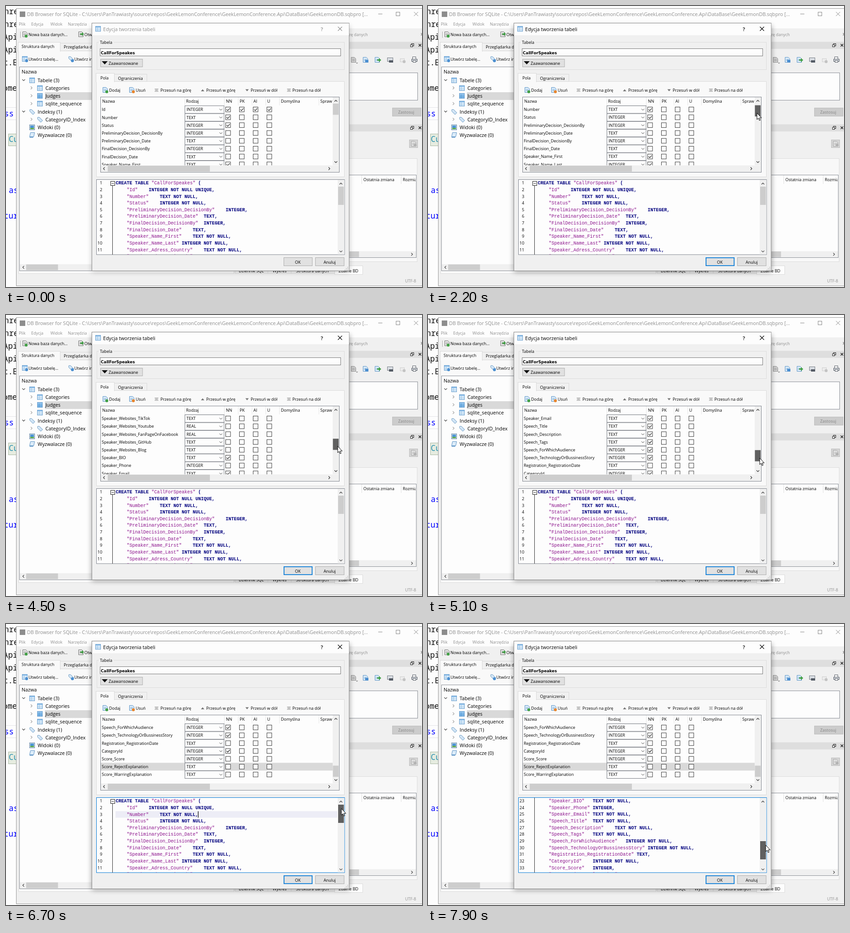
An HTML page that plays this animation: 908 by 616 pixels, repeating every 8 s.

```html
<!DOCTYPE html>
<html lang="pl">
<head>
<meta charset="utf-8">
<title>Edycja tworzenia tabeli</title>
<style>
html, body { margin: 0; width: 100%; height: 100%; overflow: hidden; background: #fdfdfd; }
svg { display: block; width: 908px; height: 616px; }
text { white-space: pre; font-family: "Open Sans", "Noto Sans", sans-serif; font-size: 8.95px; fill: #000; }
.ui { font-size: 10.7px; }
.gray { fill: #8e8e8e; }
.code { font: 10px "Liberation Mono", monospace; }
.kw { font-weight: 700; fill: #00007f; }
.str { fill: #8b108b; }
.vs { font: 17.4px "Noto Sans Mono", monospace; }
.name { font: 700 8.65px "DejaVu Sans", sans-serif; }
.end { text-anchor: end; }
.mid { text-anchor: middle; }
</style>
</head>
<body>
<svg id="stage" viewBox="0 0 908 616" xmlns="http://www.w3.org/2000/svg"></svg>
<script>
const WHITE = '#fdfdfd', FACE = '#f0f0f0', THUMB = '#cdcdcd', PRESSED = '#606060', BLUE = '#0078d7';
const ROW = 17.2, LINE = 14.65, TOP_STEP = 96.5 / 27, CODE_STEP = 40 / 11;

// name, type (I, T, R), * = not null
const fields = `Id I*|Number T*|Status I*|PreliminaryDecision_DecisionBy I|PreliminaryDecision_Date T
FinalDecision_DecisionBy I|FinalDecision_Date T|Speaker_Name_First T*|Speaker_Name_Last I*
Speaker_Adress_Country T*|Speaker_Adress_ZipCode T*|Speaker_Adress_City T*|Speaker_Adress_Street T*
Speaker_Websites_Facebook T|Speaker_Websites_Twitter T|Speaker_Websites_Instagram T
Speaker_Websites_TikTok T|Speaker_Websites_Youtube R|Speaker_Websites_FanPageOnFacebook R
Speaker_Websites_GitHub T|Speaker_Websites_Blog T|Speaker_BIO T*|Speaker_Phone I|Speaker_Email T*
Speech_Title T*|Speech_Description T*|Speech_Tags T*|Speech_ForWhichAudience I*
Speech_TechnologyOrBussinessStory I*|Registration_RegistrationDate T|CategoryId I*
Score_Score I|Score_RejectExplanation T|Score_WarringExplanation T`
  .split(/[|\n]/).map(s => {
    const [name, spec] = s.split(' ');
    return { name, type: { I: 'INTEGER', T: 'TEXT', R: 'REAL' }[spec[0]], nn: spec.length > 1 };
  });

const text = (x, y, s, cls = '', attr = '') => `<text x="${x}" y="${y}" class="${cls}" ${attr}>${s}</text>`;
const rect = (x, y, w, h, fill, stroke = 'none', attr = '') =>
  `<rect x="${x}" y="${y}" width="${w}" height="${h}" fill="${fill}" stroke="${stroke}" ${attr}/>`;
const path = (d, stroke = '#333', width = 1, fill = 'none') =>
  `<path d="${d}" stroke="${stroke}" stroke-width="${width}" fill="${fill}"/>`;
const shape = (d, fill) => `<path d="${d}" fill="${fill}"/>`;
const group = (attr, ...parts) => `<g ${attr}>${parts.join('')}</g>`;

// chevron pointing up, down, left or right around a centre
function chevron(x, y, dir, color = '#333', r = 3, w = 1.1) {
  const h = r / 2;
  const pts = {
    u: [-r, h, 0, -h, r, h], d: [-r, -h, 0, h, r, -h],
    l: [h, -r, -h, 0, h, r], r: [-h, -r, h, 0, -h, r]
  }[dir];
  return path(`M${x + pts[0]} ${y + pts[1]}L${x + pts[2]} ${y + pts[3]}L${x + pts[4]} ${y + pts[5]}`, color, w);
}
const cross = (x, y, r, color, w = 1) => path(`M${x - r} ${y - r}l${2 * r} ${2 * r}m0 ${-2 * r}l${-2 * r} ${2 * r}`, color, w);

const tableIcon = (x, y, fill = '#e4f1fc', line = '#8fbbe0') =>
  rect(x + .5, y + .5, 11, 11, fill, '#6a9fce') + rect(x + 1, y + 1, 10, 2.5, '#8fc0ea') +
  path(`M${x + 1} ${y + 6.5}h10m-10 2.8h10M${x + 4.5} ${y + 3}v8.5`, line, .8);
const tagIcon = (x, y) =>
  path(`M${x + 1} ${y + 1}h4l7 7-4 4-7-7Z`, '#6d9cc4', 1, '#cfe3f5') + `<circle cx="${x + 3.4}" cy="${y + 3.4}" r="1" fill="#fff"/>`;
const docIcon = (x, y, line = '#5b93c6', fill = '#dcecf9') =>
  path(`M${x + .5} ${y + .5}h7l3 3v8h-10Z`, line, 1, fill) + path(`M${x + 2.5} ${y + 5}h6m-6 2.5h6`, line, .8);
const badge = (x, y, color) => `<circle cx="${x}" cy="${y}" r="3.2" fill="${color}"/>`;
const printer = (x, y, c) => rect(x + 2.5, y - .5, 7, 5, WHITE, c) + rect(x + .5, y + 4.5, 12, 5, '#d4d8de', c) + rect(x + 3.5, y + 7.5, 6, 4, WHITE, c);
const floatIcon = (x, y) => rect(x + 2, y, 5, 5, 'none', '#222') + rect(x, y + 2.5, 4.5, 4.5, FACE, '#222');

function backdrop() {
  const bits = [[0, 18, -4, 'nre'], [0, 46, -4, 'nre'], [0, 74, -6, 'Api'], [0, 102, -6, 'Api'], [0, 130, -6, 't.E'],
    [0, 186, -7, 'ome'], [1, 242, -4, 'ss'], [1, 410, 6, 'as'], [1, 466, -5, 'tur']];
  return rect(0, 0, 908, 616, WHITE) +
    path('M0 222.5h23M0 249.5h23', '#e2e2e8') +
    rect(5.5, 280.5, 30, 26, '#e6ece0', '#a9b8a4') + text(6, 298, 'Cu', 'vs', 'style="fill:#2b91af"') +
    bits.map(([blue, y, x, s]) => text(x, y, s, 'vs', `style="fill:${blue ? '#0000ff' : '#111'}"`)).join('');
}

function tree() {
  const kids = [['Tabele (3)', 0, 't', 'd'], ['Categories', 1, 't', 'r'], ['Judges', 1, 's', 'r'], ['sqlite_sequence', 1, 't', 'r'],
    ['Indeksy (1)', 0, 'g', 'd'], ['CategoryID_Index', 1, 'g', 'r'], ['Widoki (0)', 0, 'v', ''], ['Wyzwalacze (0)', 0, 'w', '']];
  const icon = (k, x, y) => ({
    t: () => tableIcon(x, y),
    s: () => tableIcon(x, y, '#86bdea', '#4f94d0'),
    g: () => tagIcon(x, y),
    v: () => rect(x + .5, y + .5, 11, 11, '#e8f0e4', '#5b7fa6') + rect(x + 2, y + 2, 8, 5, '#4d94d8') + rect(x + 2, y + 7, 8, 3, '#5aa84f'),
    w: () => path(`M${x + 2.5} ${y + .5}h9l-2 9h-9Z`, '#5b93c6', 1, '#dcecf9') + path(`M${x + .5} ${y + 11}h8`, '#5b93c6', 1.5)
  })[k]();
  return rect(29.5, 133.5, 460, 447, WHITE, '#8b8f97') + text(34, 148, 'Nazwa', 'ui') +
    rect(85, 189, 110, 17, '#d9d9d9') +
    kids.map(([s, sub, k, dir], i) => {
      const y = 162.8 + i * ROW, x = 51 + sub * 17;
      return (dir ? chevron(x - 12.5, y - .5, dir, sub ? '#999' : '#333', 3) : '') + icon(k, x, Math.round(y - 6)) + text(x + 18, y + 4, s, 'ui');
    }).join('') +
    rect(30, 566, 458, 14, FACE) + rect(44, 566.5, 69.5, 12.5, THUMB) + chevron(38, 572.8, 'l');
}

function rightPanels() {
  const dock = y => rect(745, y, 163, 15.5, '#dedede') + floatIcon(883, y + 4) + cross(903.5, y + 7.5, 2.8, '#222', 1.4);
  return text(748, 66, 'zę danych', 'gray') + chevron(907, 62, 'r', '#777', 2.5) +
    dock(78.5) +
    docIcon(753, 112, '#8f8f8f', '#cfcfcf') + chevron(766, 125, 'd', '#777', 1.6) +
    docIcon(779, 112) + rect(784, 118, 7, 6, '#4c8fd0') +
    docIcon(805, 112) + shape('M810 117h4v-3l5 4.5-5 4.5v-3h-4Z', '#43a047') +
    rect(832.5, 113.5, 12, 8, '#d9dde3', '#7a8088') + rect(836, 119, 9, 5, '#555c66') +
    rect(860.5, 115.5, 9, 7, '#ececec', '#cfcfcf') + badge(869, 122, '#c3c3c3') +
    printer(885, 112, '#5a6068') +
    rect(740.5, 146.5, 158, 60, WHITE, '#8b8f97') +
    rect(843.5, 223.5, 62.5, 18, '#cccccc', '#bdbdbd') + text(856, 236, 'Zastosuj', '', 'style="fill:#838383"') +
    dock(259.5) +
    rect(880.5, 293.5, 18, 17, '#d6d6d6', '#bcbcbc') + docIcon(884, 296, '#a2a2a2', '#e2e2e2') + badge(893, 305, '#b4b4b4') +
    rect(740.5, 334.5, 157, 226, '#f8f8f8', '#dcdcdc') +
    rect(740.5, 370.5, 155, 181, WHITE, '#8b8f97') + path('M776.5 371v19M862.5 371v19', '#e0e0e0') +
    text(780, 383.5, 'Ostatnia zmiana') + group('clip-path="url(#cutRight)"', text(866, 383.5, 'Rozmiar')) +
    rect(741, 537.5, 154, 13.5, FACE) + rect(745, 538, 25.5, 12.5, THUMB) + chevron(886, 544.3, 'r');
}

function mainWindow() {
  return rect(22.5, 5.5, 890, 608, FACE, '#9a9a9a') + rect(23, 6, 885, 43, WHITE) +
    rect(30, 12, 12, 12, '#8d8d8d') +
    text(46, 21.5, 'DB Browser for SQLite - C:\\Users\\PanTrawiasty\\source\\repos\\GeekLemonConference\\GeekLemonConference.Api\\DataBase\\GeekLemonDB.sqbpro [...', 'ui gray') +
    path('M812.5 17.5h9', '#888') + rect(851.5, 13.5, 8, 8, 'none', '#888') + cross(895, 17.5, 4.5, '#888') +
    [[28, 'Plik'], [55, 'Edycja'], [97, 'Widok'], [135, 'Narzędzia']].map(([x, s]) => text(x, 43, s, 'gray')).join('') +
    path('M31.5 56v14', '#b0b0b0', 1) +
    docIcon(36, 56, '#777', '#e6e6e6') + badge(44, 66, '#43a047') + text(49, 66, 'Nowa baza danych...') +
    docIcon(158, 56, '#777', '#e6e6e6') + shape('M162 60h4v-3l4 4.5-4 4.5v-3h-4Z', '#43a047') + text(171, 66, 'Otwórz') +
    rect(27.5, 98.5, 470, 488, '#f9f9f9', '#dcdcdc') +
    rect(118.5, 81.5, 90, 17, FACE, '#d9d9d9') + text(126, 93, 'Przeglądarka danych') +
    rect(26.5, 79.5, 92, 20, '#f9f9f9', '#d9d9d9') + rect(27, 98, 91, 2, '#f9f9f9') + text(34, 92, 'Struktura danych') +
    tableIcon(35, 110) + badge(45, 120, '#4c8fd0') + text(49, 119.5, 'Utwórz tabelę...') +
    tagIcon(136, 110) + badge(145, 120, '#4c8fd0') + text(149, 119.5, 'Utwórz indeks') +
    tree() + rightPanels() +
    rect(500.5, 570.5, 217, 16, FACE, '#dcdcdc') + path('M571.5 571v15M622.5 571v15', '#dcdcdc') +
    rect(717.5, 569.5, 61, 19, WHITE, '#dcdcdc') +
    [[508, 'Dziennik SQL'], [582, 'Wykres'], [633, 'Struktura danych'], [726, 'Zdalne BD']].map(([x, s]) => text(x, 583.5, s)).join('') +
    text(871, 605.5, 'UTF-8', 'gray');
}

function fieldRow(f, i) {
  const y = 227 + i * ROW;
  const box = (x, on) => rect(x + .5, y - 5.5, 10.5, 10.5, WHITE, '#3a3a3a') +
    (on ? path(`M${x + 2.5} ${y - .2}l2.5 2.6 4.3-5`, '#222', 1.2) : '');
  return text(209, y + 3.3, f.name) +
    rect(390.5, y - 8.3, 85.5, ROW - .6, WHITE, '#777b82') + text(394, y + 3.3, f.type) + chevron(469, y, 'd', '#444', 3, 1) +
    [479, 509, 539, 569].map((x, k) => box(x, k ? i === 0 : f.nn)).join('');
}

function codeLine(f, i) {
  const quoted = `"${f.name}"`, stop = (Math.floor((4 + quoted.length) / 4) + 1) * 4;
  const y = 391.2 + (i + 1) * LINE, tail = (f.nn ? ' NOT NULL' : '') + (i === 0 ? ' UNIQUE' : '') + ',';
  return text(210, y, i + 2, 'end') + text(263.5, y, quoted, 'code str') + text(239.5 + 6 * stop, y, f.type + tail, 'code kw');
}

function dialog() {
  const bars = (x, y) => path(`M${x - 4} ${y - 2.5}h8m-7 2.5h6m-7 2.5h8`, '#777', 1);
  const tool = [[337, 'Przesuń na górę'], [437, 'Przesuń w górę'], [534, 'Przesuń w dół'], [625, 'Przesuń na dół']];
  const heads = [[210, 'Nazwa'], [393, 'Rodzaj'], [480, 'NN'], [510, 'PK'], [540, 'AI'], [570, 'U'], [600, 'Domyślna']];
  return rect(187.5, 37.5, 561.5, 543, FACE, '#8a8a8a') + rect(188, 38, 560.5, 26, WHITE) +
    tableIcon(195, 44) +
    group('id="title"', text(212, 54.5, 'Edycja tworzenia tabeli', 'ui', 'style="fill:inherit"'),
      text(687, 54.5, '?', 'ui', 'style="fill:inherit;font-weight:600"'),
      '<path d="M724.5 45.5l9 9m0-9l-9 9" stroke="currentColor" stroke-width="1.1"/>') +
    rect(198.5, 79.5, 540, 60, 'none', '#dcdcdc') + rect(202, 74, 33, 12, FACE) + text(205, 82.5, 'Tabela') +
    rect(205.5, 93.5, 525, 16, WHITE, '#7a7a7a') + text(207, 105.5, 'CallForSpeakes', 'name') +
    rect(206.5, 116.5, 91.5, 17, '#e1e1e1', '#adadad') + shape('M209 121h13l-6.5 7Z', '#111') + text(224, 129, 'Zaawansowane') +
    rect(197.5, 165.5, 541, 209, '#f9f9f9', '#dcdcdc') +
    rect(236.5, 149.5, 71, 16, FACE, '#d9d9d9') + text(244.5, 161.5, 'Ograniczenia') +
    rect(196.5, 147.5, 40, 19, '#f9f9f9', '#d9d9d9') + rect(197, 165, 39, 2, '#f9f9f9') + text(206, 160.5, 'Pola') +
    docIcon(211, 178) + badge(220, 188, '#43a047') + text(225, 188, 'Dodaj') +
    docIcon(269, 178) + badge(278, 188, '#e8862e') + text(283, 188, 'Usuń') +
    bars(328.5, 184.5) + shape('M425.5 187l3.7-4.5 3.7 4.5Z', '#777') + shape('M522.5 182.5l3.7 4.5 3.7-4.5Z', '#777') + bars(617.5, 184.5) +
    tool.map(([x, s]) => text(x, 188, s)).join('') +
    // field table
    rect(206.5, 199.5, 521, 165, WHITE, '#828790') +
    path('M390.5 200v18M476.5 200v18M507 200v18M537 200v18M567 200v18M597 200v18M683 200v18', '#e5e5e5') +
    heads.map(([x, s]) => text(x, 212.3, s)).join('') + group('clip-path="url(#cutHead)"', text(686, 212.3, 'Sprawdź')) +
    group('clip-path="url(#cutRows)"', group('id="rows"',
      `<rect id="pick" x="207" y="${227 + 32 * ROW - 8.7}" width="506" height="17"/>`, fields.map(fieldRow).join(''))) +
    rect(713, 200, 14, 149, FACE) + chevron(720, 208, 'u') + chevron(720, 342, 'd') + rect(713.5, 214, 12.5, 24.5, THUMB, 'none', 'id="topThumb"') +
    rect(207, 349.5, 520, 14.5, FACE) + chevron(214, 356.5, 'l') + chevron(705.5, 356.5, 'r') + rect(222, 350, 223, 13, THUMB) +
    // SQL preview
    rect(197.5, 380.5, 541.5, 164.5, WHITE, '#828790', 'id="editor"') +
    group('clip-path="url(#cutCode)"', group('id="lines"',
      rect(239, 410.3, 484, 14.3, '#ededf6', 'none', 'id="current"'),
      path(`M232.5 393V${393 + 36 * LINE}`, '#333'), rect(228.5, 384.5, 9, 9, WHITE, '#222'), path('M230.5 389h5', '#222'),
      text(210, 391.2, 1, 'end'), text(239.5, 391.2, 'CREATE TABLE', 'code kw'),
      text(317.5, 391.2, '"CallForSpeakes"', 'code str'), text(419.5, 391.2, '(', 'code kw'),
      fields.map(codeLine).join(''),
      path('M419.5 410.5v14', '#000', 1.2).replace('<path', '<path id="caret"'))) +
    rect(724, 381, 14.5, 163.5, FACE) + chevron(731, 389.5, 'u') + chevron(731, 537.8, 'd') + rect(725, 396, 12.5, 40, THUMB, 'none', 'id="codeThumb"') +
    rect(606.5, 551.5, 62, 18, '#e1e1e1', '#adadad') + rect(606.8, 551.8, 61.4, 17.4, 'none', BLUE, 'stroke-width="1.7" id="okRing"') +
    text(637, 564.5, 'OK', 'mid') +
    rect(675.5, 551.5, 62.5, 18, '#e1e1e1', '#adadad') + text(706.5, 564.5, 'Anuluj', 'mid') +
    [[745, 572], [742, 575], [745, 575], [739, 578], [742, 578], [745, 578]].map(([x, y]) => rect(x, y, 1.4, 1.4, '#aaa')).join('');
}

const clip = (id, x, y, w, h) => `<clipPath id="${id}">${rect(x, y, w, h, '#000')}</clipPath>`;
document.getElementById('stage').innerHTML =
  `<defs>${clip('cutRight', 860, 370, 34, 20)}${clip('cutHead', 680, 200, 32, 18)}${clip('cutRows', 207, 218, 506, 131.5)}${clip('cutCode', 198, 381, 526, 164)}
  <filter id="blur" x="-10%" y="-10%" width="120%" height="120%"><feGaussianBlur stdDeviation="6"/></filter></defs>` +
  backdrop() + mainWindow() +
  rect(187, 43, 563, 540, '#000', 'none', 'id="shadow" filter="url(#blur)"') +
  dialog() +
  group('id="cursor"', path('M0 -.3v14.2l3.2-2.9 2.2 5 2.1-.9-2.1-4.9h4.5Z', '#000', 1, '#fff'));

const el = id => document.getElementById(id);
const parts = Object.fromEntries(['title', 'rows', 'pick', 'topThumb', 'editor', 'lines', 'current', 'caret', 'codeThumb', 'okRing', 'shadow', 'cursor']
  .map(id => [id, el(id)]));

// time, x, y
const moves = [[100, 878, 105], [700, 878, 105], [1400, 728, 232], [1500, 728, 232], [2000, 718, 232], [2100, 718, 232],
  [2200, 718, 235], [3000, 718, 235], [3100, 719, 237.5], [3200, 720, 241], [3300, 720, 241], [4500, 724, 288], [5500, 724, 331],
  [5700, 724, 333], [6000, 722, 345], [6300, 700, 414], [6400, 700, 414], [6600, 733, 404], [6700, 732, 405], [6900, 732, 405],
  [7300, 732, 446], [7900, 737, 485]];

function pointer(t) {
  const i = moves.findIndex(m => m[0] >= t);
  if (i < 0) return moves[moves.length - 1].slice(1);
  if (i === 0) return moves[0].slice(1);
  const [a, ax, ay] = moves[i - 1], [b, bx, by] = moves[i], k = (t - a) / (b - a);
  return [ax + (bx - ax) * k, ay + (by - ay) * k];
}
const clamp = (v, lo, hi) => Math.min(hi, Math.max(lo, v));
const set = (node, name, value) => node.setAttribute(name, value);

function draw(t) {
  const [x, y] = pointer(t);
  const active = clamp((t - 1500) / 500, 0, 1);
  const focused = t >= 6300;
  const row = t < 1600 ? 0 : clamp(Math.round((y - 231) / TOP_STEP), 0, 27);
  const line = t < 6700 ? 0 : clamp(Math.round((y - 405) / CODE_STEP), 0, 25);

  set(parts.cursor, 'transform', `translate(${Math.round(x)} ${Math.round(y)})`);
  set(parts.cursor, 'visibility', t < 100 ? 'hidden' : 'visible');
  set(parts.shadow, 'opacity', .2 + .16 * active);
  set(parts.okRing, 'opacity', active);
  parts.title.style.color = parts.title.style.fill = t < 1600 ? '#8e8e8e' : '#000';

  set(parts.rows, 'transform', `translate(0 ${-row * ROW})`);
  set(parts.topThumb, 'y', 214 + row * TOP_STEP);
  set(parts.topThumb, 'fill', t >= 1600 && t < 5800 ? PRESSED : THUMB);
  set(parts.pick, 'fill', focused ? '#d9d9d9' : '#cde8ff');

  set(parts.editor, 'stroke', focused ? BLUE : '#828790');
  set(parts.current, 'visibility', focused ? 'visible' : 'hidden');
  set(parts.caret, 'visibility', focused && (t - 6300) % 1000 < 500 ? 'visible' : 'hidden');
  set(parts.lines, 'transform', `translate(0 ${-line * LINE})`);
  set(parts.codeThumb, 'y', 396 + line * CODE_STEP);
  set(parts.codeThumb, 'fill', t >= 6600 ? PRESSED : THUMB);
}

const start = performance.now();
function tick() {
  const t = (performance.now() - start) % 8000;
  draw(Math.floor(t / 100) * 100);
  requestAnimationFrame(tick);
}
tick();
</script>
</body>
</html>
```
